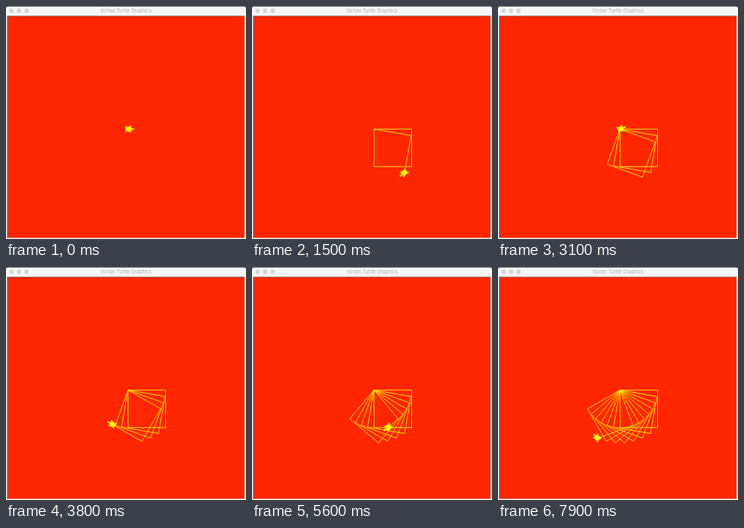
These frames come from a looping animation (300x292 px, 8000 ms). An HTML page:

```html
<!DOCTYPE html>
<html lang="en">
<head>
<meta charset="utf-8">
<title>Turtle squares</title>
<style>
  html, body { margin: 0; width: 100%; height: 100%; overflow: hidden; background: #fff; }
  svg { display: block; width: 300px; height: 292px; }
  text { font: 6.1px Inter, "Liberation Sans", sans-serif; fill: #b2b0b0; text-anchor: middle; }
</style>
</head>
<body>
<svg viewBox="0 0 300 292">
  <rect width="300" height="4" fill="#4c4c4c"/>
  <path d="M0 12.5V3Q0 .7 2.3 .7H297.7Q300 .7 300 3V12.5Z" fill="#f6f6f6"/>
  <g fill="#d6d4d4">
    <circle cx="7" cy="6" r="2.8"/>
    <circle cx="16.3" cy="6" r="2.8"/>
    <circle cx="25.7" cy="6" r="2.8"/>
  </g>
  <text x="150" y="8.2">Vorlan Turtle Graphics</text>
  <rect x="1.5" y="12.5" width="297" height="278.4" fill="#c9b6b2"/>
  <path d="M1.5 290.9V12.5H298.5" fill="none" stroke="#8a6a64" stroke-width=".8"/>
  <rect x="2" y="13" width="296" height="277.4" fill="#ff2600"/>
  <path id="trail" fill="none" stroke="#fffb00" stroke-width=".8" stroke-linejoin="round"/>
  <polygon id="turtle" fill="#fffb00" stroke="#fffb00"/>
</svg>
<script>
const LOOP = 8000, TICK = 100;
const STEPS_PER_MS = 0.0774;
const HOME = { x: 152.5, y: 154.25 };
const SCALE = 0.47, SIDE = 100 * SCALE;

// Steps for one side, one right-angle turn, and the small turn after each square.
const HOPS = 9, TURN = 11, TILT = 2;
const EDGE = HOPS + TURN, SQUARE = 4 * EDGE + TILT;

const trail = document.getElementById("trail");
const turtle = document.getElementById("turtle");

// Right half of the body as [forward, sideways], mirrored for the left.
const half = [[16, 0], [14, 2], [10, 1], [7, 4], [9, 7], [8, 9], [5, 6], [1, 7],
              [-3, 5], [-6, 8], [-8, 6], [-5, 4], [-7, 0]];
const body = half.concat(half.slice(1, -1).reverse().map(([f, s]) => [f, -s]));
turtle.setAttribute("points", body.join(" "));

function move(p, heading, length) {
  const a = heading * Math.PI / 180;
  return { x: p.x + length * Math.cos(a), y: p.y + length * Math.sin(a) };
}

function draw(time) {
  const step = Math.floor(time * STEPS_PER_MS + 1e-6);
  const square = Math.floor(step / SQUARE);
  const local = step % SQUARE;
  let pos = HOME, heading = 0;
  let d = `M${HOME.x} ${HOME.y}`;

  const side = (angle, part) => {
    pos = move(pos, angle, SIDE * part);
    d += `L${pos.x.toFixed(3)} ${pos.y.toFixed(3)}`;
  };

  for (let k = 0; k <= square; k++) {
    const left = k < square ? SQUARE : local;
    for (let e = 0; e < 4 && left >= e * EDGE; e++) {
      const done = Math.min(left - e * EDGE, EDGE);
      heading = k * 10 + e * 90;
      side(heading, Math.min(done / HOPS, 1));
      heading += 90 * Math.max(done - HOPS, 0) / TURN;
    }
    heading += 10 * Math.max(left - 4 * EDGE, 0) / TILT;
  }

  trail.setAttribute("d", d);
  turtle.setAttribute("transform",
    `translate(${pos.x} ${pos.y}) rotate(${heading}) scale(${SCALE})`);
}

const start = performance.now();
function frame() {
  const t = (performance.now() - start) % LOOP;
  draw(Math.floor(t / TICK) * TICK);
  requestAnimationFrame(frame);
}
frame();
</script>
</body>
</html>
```
